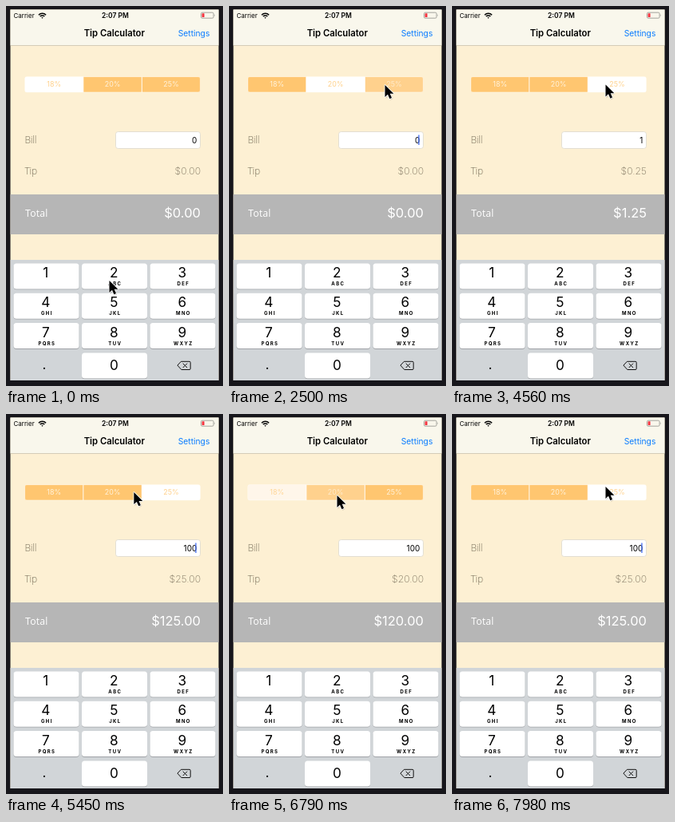
Write an HTML page that moves like this. It is 272 px wide and 476 px high and loops after 8000 ms.

```html
<!DOCTYPE html>
<html lang="en">
<head>
<meta charset="utf-8">
<title>Tip Calculator</title>
<style>
html, body { margin: 0; width: 100%; height: 100%; overflow: hidden; background: #17161b; }
svg { display: block; width: 100%; height: 100%; font-family: Inter, sans-serif; }
.label { font-family: "Open Sans", sans-serif; font-weight: 300; }
.mid { text-anchor: middle; }
.end { text-anchor: end; }
</style>
</head>
<body>
<svg viewBox="0 0 272 476">
  <rect width="272" height="476" fill="#17161b"/>
  <rect x="5.5" y="4.5" width="261" height="464.5" fill="#fdf0d3"/>
  <rect x="5.5" y="4.5" width="261" height="44.5" fill="#f9f7ec"/>
  <rect x="5.5" y="49" width="261" height=".7" fill="#c3bdac"/>

  <text x="9.5" y="15" font-size="8">Carrier</text>
  <g fill="none" stroke="#000" stroke-width="1.5">
    <path d="M40.9 11.2a6.4 6.4 0 0 1 9.2 0M42.7 13.1a3.9 3.9 0 0 1 5.6 0"/>
    <path d="M45.5 15.8l-1.2-1.3a1.7 1.7 0 0 1 2.4 0z" fill="#000" stroke="none"/>
  </g>
  <text class="mid" x="136.9" y="15" font-size="8.5" font-weight="600">2:07 PM</text>
  <rect x="244.5" y="8.2" width="15.6" height="7" rx="1.4" fill="none" stroke="#8f8e8a" stroke-width=".8"/>
  <rect x="245.6" y="9.3" width="3" height="4.8" rx=".5" fill="#f5333f"/>
  <path d="M261.2 10.3q1.3 1.4 0 2.8z" fill="#8f8e8a"/>
  <text class="mid" x="135.8" y="38" font-size="11.3" font-weight="600">Tip Calculator</text>
  <text x="215.7" y="38" font-size="10.3" fill="#0a7cff">Settings</text>

  <clipPath id="rounded"><rect x="23.5" y="88.5" width="220" height="19.5" rx="2.5"/></clipPath>
  <g id="segments" clip-path="url(#rounded)"></g>
  <rect x="23.6" y="88.6" width="219.8" height="19.3" rx="2.5" fill="none" stroke="#fff" stroke-width=".7" opacity=".6"/>

  <g fill="#7d745f">
    <text class="label" x="23.5" y="172" font-size="12" letter-spacing="-.2">Bill</text>
    <text class="label" x="23.5" y="211" font-size="12" letter-spacing="-.2">Tip</text>
    <text id="tip" class="end" x="244" y="210.5" font-size="12.2" font-weight="200"></text>
  </g>
  <rect x="137.5" y="157.5" width="106" height="21" rx="3" fill="#fff" stroke="#dcd8cd" stroke-width=".8"/>
  <text id="bill" class="end" x="239.3" y="171.5" font-size="10"></text>
  <rect id="caret" x="237.3" y="161.5" width="1.3" height="12.5" fill="#3f6bf0"/>

  <rect x="5.5" y="236" width="261" height="50" fill="#b6b6b6"/>
  <g fill="#fff">
    <text class="label" x="24" y="264" font-size="12.2" letter-spacing=".25" style="font-weight:400">Total</text>
    <text id="total" class="end" x="244" y="265.3" font-size="16.5"></text>
  </g>

  <rect x="5.5" y="318" width="261" height="151" fill="#d1d5d8"/>
  <g id="keys"></g>
  <path d="M219.8 445.3H230q1.2 0 1.2 1.2v7.8q0 1.2-1.2 1.2H219.8l-4.6-5.1zM222 448l4.8 4.8M226.8 448l-4.8 4.8"
    fill="none" stroke="#111" stroke-linejoin="round" stroke-linecap="round"/>

  <g id="cursor">
    <path d="M1 2V17L4 14 7 19 10 17 8 12H12Z" fill="#000" opacity=".13"/>
    <path d="M0 0V15L3.5 11.8 5.9 17.2 8.5 16.1 6.2 10.8H10.9Z" stroke="#fff" stroke-width="1.6" stroke-linejoin="round" paint-order="stroke"/>
  </g>
</svg>
<script>
const LOOP = 8000, TICK = 147;
const $ = id => document.getElementById(id);

function add(parent, tag, attrs, text = "") {
  const el = document.createElementNS("http://www.w3.org/2000/svg", tag);
  for (const name in attrs) el.setAttribute(name, attrs[name]);
  el.textContent = text;
  parent.append(el);
  return el;
}

// Keypad
const letters = ["", "ABC", "DEF", "GHI", "JKL", "MNO", "PQRS", "TUV", "WXYZ"];
function addKey(digit, col, row, sub) {
  const x = 9.5 + col * 85.5, y = 322.5 + row * 37.3, mid = x + 41;
  add($("keys"), "rect", { x, y: y + .8, width: 82, height: 32, rx: 3.5, fill: "#a0a3a7" });
  add($("keys"), "rect", { x, y, width: 82, height: 32, rx: 3.5, fill: "#fff" });
  add($("keys"), "text", { class: "mid", x: mid - .7, y: y + (row < 3 ? 17.5 : 22), "font-size": 17.2 }, digit);
  add($("keys"), "text", { class: "mid", x: mid + .9, y: y + 27.5, "font-size": 6, "font-weight": 700, "letter-spacing": 1.4 }, sub);
}
letters.forEach((sub, i) => addKey(i + 1, i % 3, Math.floor(i / 3), sub));
addKey(0, 1, 3, "");
add($("keys"), "text", { class: "mid", x: 48, y: 455, "font-size": 17 }, ".");

// Segmented control
const rates = [18, 20, 25], WIDTH = 73.4;
const segments = rates.map((rate, i) => {
  const x = 23.5 + i * WIDTH;
  const box = add($("segments"), "rect", { x, y: 88.5, width: WIDTH, height: 19.5 });
  const label = add($("segments"), "text", { class: "mid", x: x + WIDTH / 2, y: 101.3, "font-size": 8.9 }, rate + "%");
  return { box, label };
});
for (const i of [1, 2])
  add($("segments"), "rect", { x: 23 + i * WIDTH, y: 88.5, width: .9, height: 19.5, fill: "#fff" });

// Script, in ticks: rate choices, typed digits, cursor stops [arrive, leave, x, y]
const picks = [[-1, 0], [12, 1], [18, 2], [39, 1], [42, 0], [46, 1], [50, 2]];
const typed = [26, 32, 33];
const stops = [
  [0, 0, 129.5, 344], [2, 2, 84, 409], [7, 7, 131, 68], [10, 13, 133, 102],
  [17, 17, 195.5, 99], [20, 35, 192.5, 98.5], [41, 43, 68.5, 97],
  [46, 47, 135.5, 102], [49, 52, 191, 98], [54, 54, 192.5, 91]
];

const ease = f => f * f * (3 - 2 * f);

function cursorAt(k) {
  const n = stops.findLastIndex(s => s[0] <= k);
  const [, leave, x, y] = stops[n], [arrive, , x2, y2] = stops[n + 1] || stops[n];
  const f = k > leave ? ease((k - leave) / (arrive - leave)) : 0;
  return [x + (x2 - x) * f, y + (y2 - y) * f];
}

function mix(a, b, f) {
  return `rgb(${a.map((v, i) => Math.round(v + (b[i] - v) * f))})`;
}

// A press tints a segment one tick early; the choice then fades over one tick
function whiteness(k, n) {
  const [start, current] = picks[n], next = picks[n + 1];
  const levels = [0, 0, 0];
  levels[current] = 1;
  if (k === start) {
    levels[current] = .2;
    levels[picks[n - 1][1]] = .85;
  }
  if (next && k === next[0] - 1) levels[next[1]] = .2;
  return levels;
}

// The blink restarts with the first typed digit
const caretHidden = k => (k < typed[0] ? k : k - typed[0] + 2) % 7 < 2;
const money = v => "$" + v.toFixed(2);

function draw(time) {
  const k = Math.floor((time % LOOP + 8) / TICK);
  const n = picks.findLastIndex(p => p[0] <= k);
  whiteness(k, n).forEach((level, i) => {
    segments[i].box.setAttribute("fill", mix([255, 198, 112], [255, 255, 255], level));
    segments[i].label.setAttribute("fill", mix([255, 242, 219], [255, 209, 139], level));
  });

  const bill = "100".slice(0, typed.filter(t => t <= k).length) || "0";
  const tip = bill * rates[picks[n][1]] / 100;
  $("bill").textContent = bill;
  $("tip").textContent = money(tip);
  $("total").textContent = money(+bill + tip);
  $("caret").setAttribute("opacity", caretHidden(k) ? 0 : 1);
  $("cursor").setAttribute("transform", `translate(${cursorAt(k)})`);
}

const begin = performance.now();
function loop() {
  draw(performance.now() - begin);
  requestAnimationFrame(loop);
}
loop();
</script>
</body>
</html>
```
